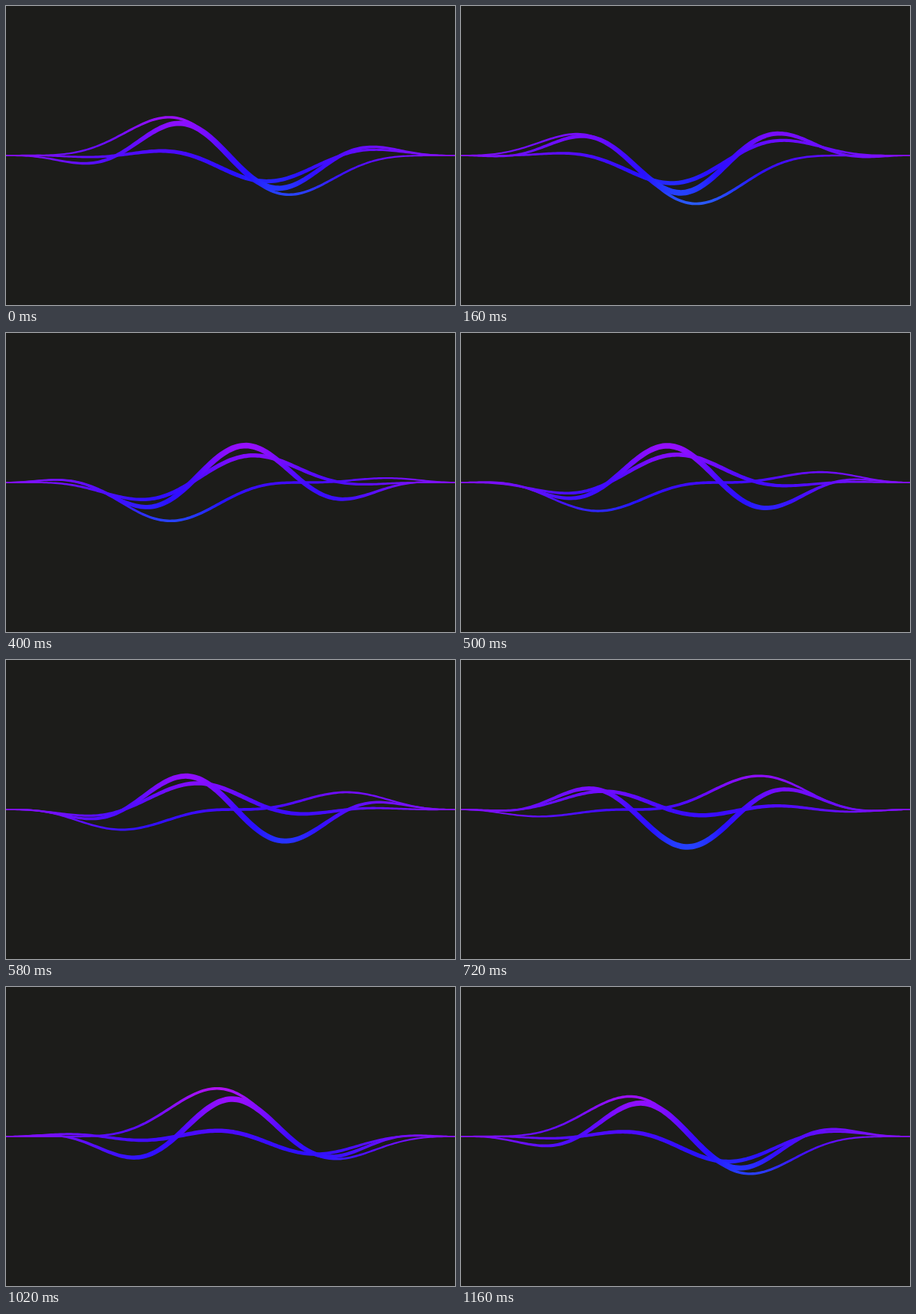
Animation of 600x400 px, one loop 1.18 s. Source, as an HTML page with a canvas:

```html
<!DOCTYPE html>
<html>
<head>
<meta charset="utf-8">
<style>
  html, body { margin: 0; overflow: hidden; background: #1c1c1a; }
  canvas { display: block; }
</style>
</head>
<body>
<canvas width="600" height="400"></canvas>
<script>
const ctx = document.querySelector('canvas').getContext('2d');
const W = 600, MID = 200, STEP = 3;
const { sin, cos, PI } = Math;

// Height above the middle line, and the extra width at the centre
const waves = [
  { extra: 1.7, height: a => 50 * (sin(a) - sin(2 * a) / 2) },
  { extra: 3.6, height: a => 21.25 * (cos(a) - sin(2 * a)) },
  { extra: 5.6, height: a => -50 * sin(2 * a) }
];

// Height, then colour
const ramp = [
  [-65, 42, 92, 250], [-45, 36, 56, 255], [-25, 40, 16, 255], [0, 64, 10, 255],
  [30, 120, 12, 255], [50, 150, 15, 255], [66, 176, 18, 240]
];
const edgeColor = [128, 16, 250];

const mix = (a, b, t) => a + (b - a) * t;
const envelope = x => sin(PI * x / W) ** 2;

function colorAt(x, h) {
  let i = 1;
  while (i < ramp.length - 1 && h > ramp[i][0]) i++;
  const lo = ramp[i - 1], hi = ramp[i];
  const t = Math.min(1, Math.max(0, (h - lo[0]) / (hi[0] - lo[0])));
  const edge = (1 - envelope(x)) ** 2;
  return `rgb(${edgeColor.map((c, k) => Math.round(mix(mix(lo[k + 1], hi[k + 1], t), c, edge)))})`;
}

function drawWave({ extra, height }, shift) {
  const up = x => envelope(x) * height(2 * PI * (x + shift) / W);
  const paint = ctx.createLinearGradient(0, 0, W, 0);
  const top = [], bottom = [];
  for (let x = 0; x <= W; x += STEP) {
    const h = up(x);
    const slope = up(x - 0.5) - up(x + 0.5);
    const half = (2 + extra * envelope(x)) / 2 / Math.hypot(1, slope);
    const dx = slope * half;
    top.push([x + dx, MID - h - half]);
    bottom.unshift([x - dx, MID - h + half]);
    paint.addColorStop(x / W, colorAt(x, h));
  }
  ctx.beginPath();
  for (const point of top.concat(bottom)) ctx.lineTo(...point);
  ctx.fillStyle = paint;
  ctx.fill();
}

function draw() {
  // 60 poses at 20 ms, with one skipped halfway
  let pose = Math.floor(performance.now() % 1180 / 20);
  if (pose > 29) pose++;
  ctx.fillStyle = '#1c1c1a';
  ctx.fillRect(0, 0, W, 400);
  for (const wave of waves) drawWave(wave, 2.5 + 10 * pose);
  requestAnimationFrame(draw);
}
draw();
</script>
</body>
</html>
```
